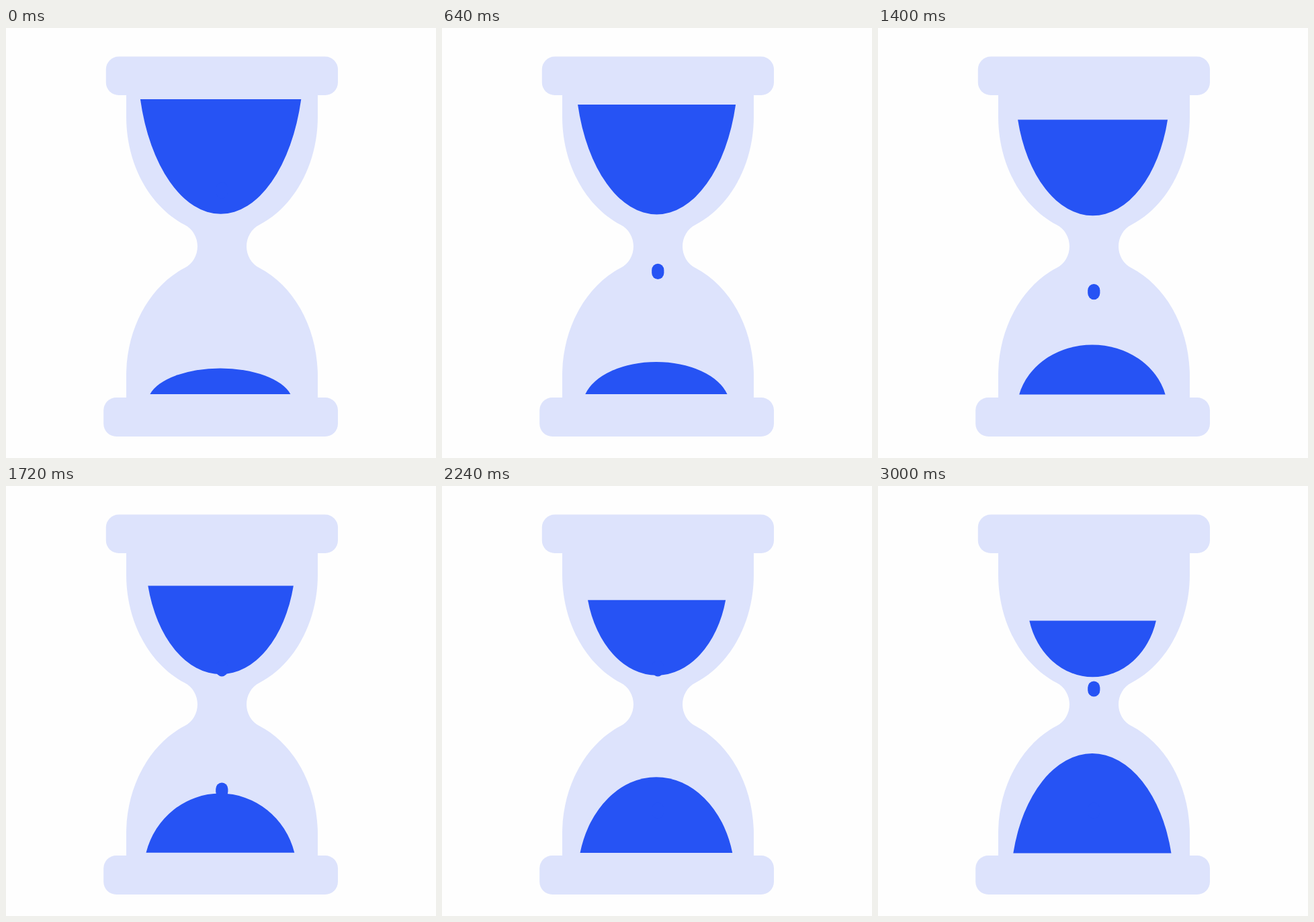
An HTML page that plays this animation: 640x640 px, repeating every 3.04 s.

```html
<!DOCTYPE html>
<html lang="en">
<head>
<meta charset="utf-8">
<title>Hourglass</title>
<style>
  html, body { margin: 0; width: 100%; height: 100%; overflow: hidden; background: #fefefe; }
  svg { display: block; width: 100vw; height: 100vh; }
  .glass { fill: #dde3fc; }
  .sand { fill: #2653f4; }
</style>
</head>
<body>
<svg viewBox="0 0 640 640">
  <g class="glass">
    <rect x="148.8" y="42.6" width="345.2" height="57.4" rx="19"/>
    <rect x="145.2" y="550" width="348.8" height="58" rx="19"/>
    <path id="side" d="M179 90V132C179 203 214 266 266 293C278 299 285 312 285 325
      S278 351 266 357C214 384 179 447 179 518V560H325V90Z"/>
    <use href="#side" transform="translate(643) scale(-1 1)"/>
  </g>
  <g class="sand">
    <path id="upper"/>
    <path id="lower"/>
    <g id="drops"></g>
  </g>
</svg>
<script>
  const STEP = 40, STEPS = 76;
  const DROP_GAP = 6.12, DROP_LIFE = 10, DROP_TOP = 230, DROP_SPEED = 30.2;
  const CUT = 0.25; // where the flat rim cuts the ellipse, as a share of its radius

  const byId = id => document.getElementById(id);
  const mix = (a, b, p) => a + (b - a) * p;

  // An ellipse cap between a flat rim and a round tip.
  function setHeap(id, axis, half, rim, tip) {
    const rx = half / Math.sqrt(1 - CUT * CUT);
    const ry = Math.abs(tip - rim) / (1 - CUT);
    const sweep = tip < rim ? 1 : 0;
    byId(id).setAttribute("d",
      `M${axis - half} ${rim}A${rx} ${ry} 0 0 ${sweep} ${axis + half} ${rim}Z`);
  }

  // Slow start, then an almost steady flow.
  const flow = u => 0.088 * u + 1.627 * u * u - 0.715 * u * u * u;

  function addDrop(start) {
    const el = document.createElementNS("http://www.w3.org/2000/svg", "rect");
    const shape = { x: 312.2, width: 18.2, height: 23.2, rx: 9.1, ry: 9.6 };
    for (const key in shape) el.setAttribute(key, shape[key]);
    byId("drops").append(el);
    return { el, start };
  }

  const drops = [];
  for (let start = 0; start < STEPS; start += DROP_GAP) drops.push(addDrop(Math.floor(start)));

  function draw(time) {
    const step = Math.floor(time / STEP) % STEPS;
    const p = flow(step / (STEPS - 1));
    setHeap("upper", 319.6, mix(119.7, 94.3, p), mix(106, 200.5, p), mix(276.8, 284.3, p));
    setHeap("lower", 318.9, mix(104.5, 117.6, p), mix(545, 546.4, p), mix(506.4, 398, p));
    for (const { el, start } of drops) {
      const age = step - start;
      el.setAttribute("visibility", age >= 0 && age < DROP_LIFE ? "visible" : "hidden");
      el.setAttribute("y", DROP_TOP + DROP_SPEED * age);
    }
  }

  const begin = performance.now();
  function tick() {
    draw(performance.now() - begin);
    requestAnimationFrame(tick);
  }
  tick();
</script>
</body>
</html>
```
